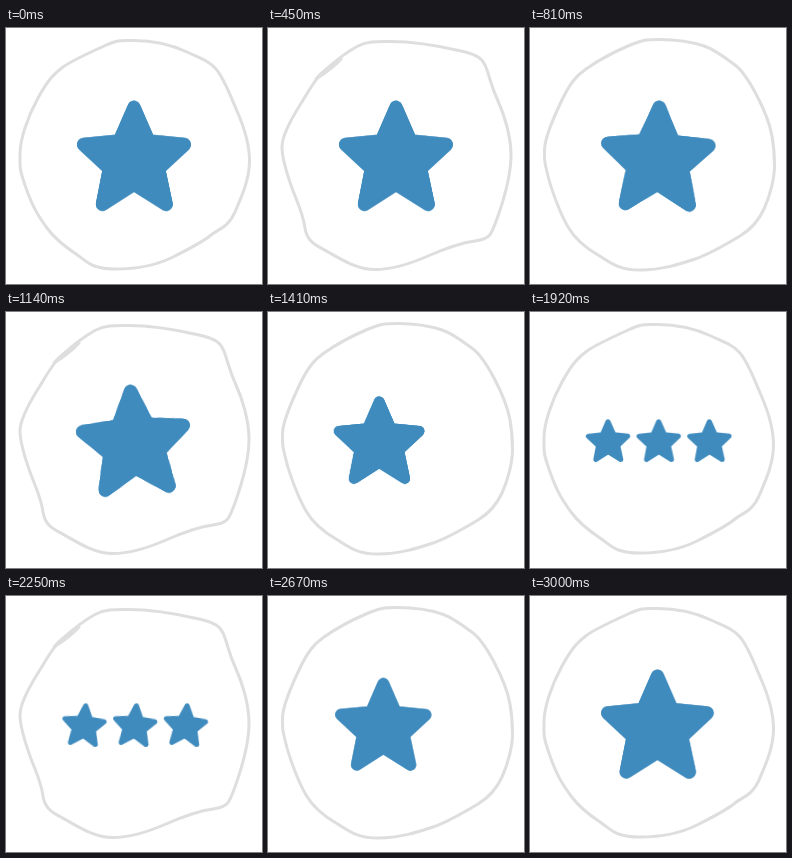
Recreate the animation shown at these times as an HTML page without scripts. Size 256 by 256 pixels, loop 3.15 s.

```html
<!DOCTYPE html>
<html lang="en">
<head>
<meta charset="utf-8">
<title>Star rating</title>
<style>
  html, body { margin: 0; width: 100%; height: 100%; overflow: hidden; background: #fff; }
  svg { display: block; width: 100vw; height: 100vh; }

  /* Four hand-drawn outlines, swapped every 150 ms */
  .ring {
    --a: path("M128 12.5C150 12.5 168 18 181 24S202 32 210 41S224 67 231 83S243.5 115 243.5 133S236 168 229 184S212 201 205 207S181 222 167 229S135 241 110 241S82 234 70 226S49 211 41 200S27 180 20 160S14 140 14 126S21 90 32 70S49 45 57 39S83 25 98 18S116 12.5 128 12.5Z");
    --b: path("M130 11.5C148 11.5 162 14 174 18S198 32 205 37S218 51 226 66S240 97 242 108S244.5 126 244.5 138S240 168 234 181S220 202 210 208S180 226 165 231S132 242 110 242S80 234 68 227S45 211 38 199S22 164 18 148S14.5 132 14.5 122S22 93 31 74S46 48 56 41S84 24 98 18S116 11.5 130 11.5Z");
    --c: path("M126 12C150 12 170 17 186 24S208 36 216 50S234 84 239 100S244.5 120 244.5 130S239 172 230 190S214 208 200 214S166 230 150 235S128 240.5 112 240.5S80 233 66 225S43 210 36 196S15 142 15 124S22 88 32 72S48 46 60 37S100 12 126 12Z");
    --d: path("M122 13.5C150 13.5 176 19 193 23S215 30 219 42S224 60 230 73S243 108 243 127S237 168 230 188S222 211 207 213S176 221 160 228S124 241.5 107 241.5S74 232 62 225S39 215 37 200S29 174 24 160S14 130 14 119S22 93 32 77S46 52 56 43S79 24 89 18.5S110 13.5 122 13.5ZM48 51Q57 40 73 31Q64 41 48 51Z");
    d: var(--a);
    fill: none;
    stroke: #dedede;
    stroke-width: 3;
    stroke-linejoin: round;
    animation: wobble 3.15s step-end infinite;
  }
  @keyframes wobble {
    0%, 19.04%, 38.09%, 57.14%, 76.19%, 95.23%, 100% { d: var(--a); }
    4.76%, 23.8%, 42.85%, 61.9%, 80.95% { d: var(--b); }
    9.52%, 28.57%, 47.61%, 66.66%, 85.71% { d: var(--c); }
    14.28%, 33.33%, 52.38%, 71.42%, 90.47% { d: var(--d); }
  }

  .stars { fill: #3f8bbe; stroke: #3f8bbe; stroke-width: 13; stroke-linejoin: round; }
  .row { animation: shrink 3.15s linear infinite; }
  .slot { animation: slide 3.15s ease-in-out infinite; }
  .star { animation: wiggle 3.15s ease-in-out infinite; }

  /* One big star moves to the left end of the row and back, settling just short of full size */
  @keyframes shrink {
    0%, 41.905% { transform: translate(128px, 132.4px) scale(1); }
    50.476%, 79.048% { transform: translate(78.1px, 130.4px) scale(.39); }
    86.667%, 100% { transform: translate(127.4px, 132.6px) scale(.987); }
  }
  /* The others come out from behind it */
  @keyframes slide {
    0%, 50.476%, 79.048%, 100% { transform: translate(0, 0); }
    59.048%, 75.238% { transform: translate(var(--x), 0); }
  }
  @keyframes wiggle {
    0%, 22.857%, 41.905%, 60%, 76.19%, 100% { transform: rotate(0deg); }
    30.476%, 71.429% { transform: rotate(4.5deg); }
    37.143%, 64.762% { transform: rotate(-4deg); }
  }
</style>
</head>
<body>
<svg viewBox="0 0 256 256">
  <defs>
    <path id="shape" d="M0-52.9L14.6-19.3L50.3-15.8L24.6 8.1L32.2 43.8L0 23.6L-31.6 43.7L-24.6 8.1L-50.4-15.9L-14.6-19.3Z"/>
  </defs>
  <path class="ring" d="M128 12.5"/>
  <g class="stars">
    <g class="row">
      <g class="slot" style="--x: 260px"><use class="star" href="#shape"/></g>
      <g class="slot" style="--x: 130px"><use class="star" href="#shape"/></g>
      <use class="star" href="#shape"/>
    </g>
  </g>
</svg>
</body>
</html>
```
